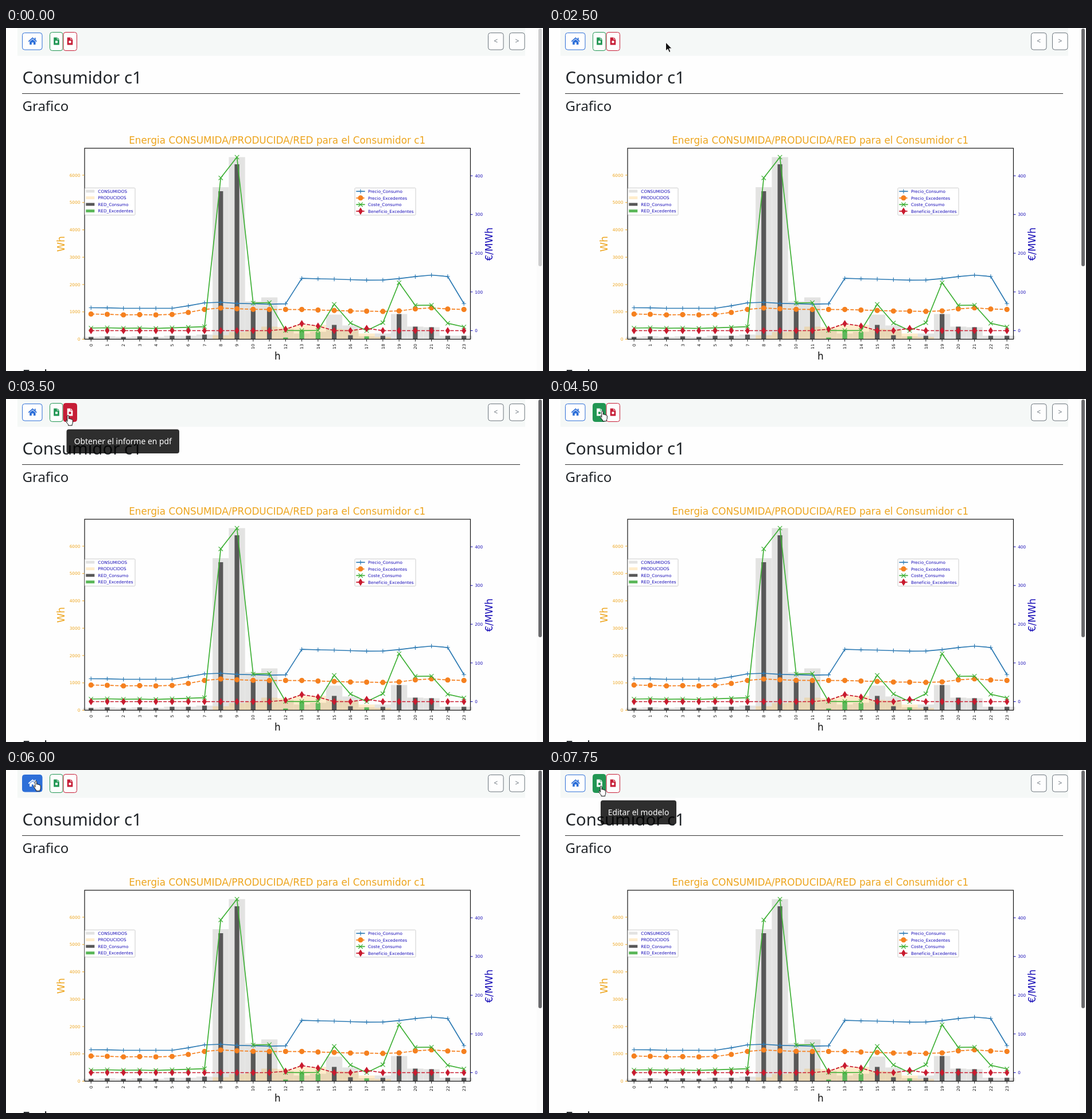
These frames come from a looping animation (936x599 px, 8000 ms). An HTML page:

```html
<!DOCTYPE html>
<html lang="es">
<head>
<meta charset="utf-8">
<title>Consumidor c1</title>
<style>
  html, body { margin: 0; width: 100%; height: 100%; overflow: hidden; background: #fefefe; }
  svg { display: block; }
  text { font-family: "Noto Sans", sans-serif; white-space: pre; }
  .chart text { font: 7.3px "DejaVu Sans", sans-serif; }
  .chart text.big { font-size: 16.83px; }
</style>
</head>
<body>
<svg id="stage" width="936" height="599" viewBox="0 0 936 599"></svg>
<script>
const stage = document.getElementById('stage');

function add(parent, tag, attrs = {}, text) {
  const node = document.createElementNS('http://www.w3.org/2000/svg', tag);
  set(node, attrs);
  if (text !== undefined) node.textContent = text;
  return parent.appendChild(node);
}
function set(node, attrs) {
  for (const key in attrs) node.setAttribute(key, attrs[key]);
}
const rect = (parent, x, y, width, height, attrs) =>
  add(parent, 'rect', { x, y, width, height, ...attrs });
const label = (parent, x, y, text, attrs) => add(parent, 'text', { x, y, ...attrs }, text);
const path = (parent, d, attrs) => add(parent, 'path', { d, ...attrs });

// Page
const INK = '#212529';
rect(stage, 20, 0, 885, 48.5, { fill: '#f5f8f7' });
rect(stage, 925, 0, 11, 599, { fill: '#fbfbfb' });
const thumb = rect(stage, 928, 1, 6, 415, { rx: 3 });
label(stage, 28.5, 97, 'Consumidor c1', { 'font-size': 29.4, fill: INK });
rect(stage, 28, 114, 868, 1, { fill: '#333' });
label(stage, 28.5, 145, 'Grafico', { 'font-size': 24, fill: INK });
label(stage, 28.5, 614, 'Fecha', { 'font-size': 24, fill: INK });

// Toolbar
function button(x, y, w, h, color, draw) {
  rect(stage, x, y, w, h, { rx: 4, fill: '#fefefe' });
  const back = rect(stage, x, y, w, h, { rx: 4, fill: color, stroke: color });
  const icon = add(stage, 'g');
  draw(icon);
  return level => {
    set(back, { 'fill-opacity': level });
    set(icon, { color: level > 0.5 ? '#fff' : color, opacity: level > 0.5 ? level : 1 });
    if (icon.mark) set(icon.mark, { fill: level > 0.5 ? color : '#fff' });
  };
}
function house(g) {
  path(g, 'M39.3 23.6L46.3 17.4L53.4 23.6', { fill: 'none', stroke: 'currentColor', 'stroke-width': 1.8 });
  path(g, 'M41.2 24.1L46.3 19.8L51.5 24.1V29H47.9V25.3H44.8V29H41.2ZM49.8 17H51.6V21H49.8Z', { fill: 'currentColor' });
}
const sheet = x => g => {
  path(g, `M${x} 16.5h5.6v3.7h4v9.3h-9.6zM${x + 6.4} 16.5l3.2 3.1h-3.2z`, { fill: 'currentColor' });
  g.mark = rect(g, x + 2.8, 22.3, 4, 4);
};
const arrowLabel = (x, text) => g =>
  label(g, x, 27, text, { 'font-size': 12, 'text-anchor': 'middle', fill: 'currentColor' });

const buttons = {
  home: button(28.5, 8.5, 34.5, 29.5, '#2d6fd8', house),
  excel: button(76.5, 7.5, 22.5, 32, '#219653', sheet(83.2)),
  pdf: button(100, 7.5, 23.5, 32, '#c61d36', sheet(106.7)),
};
button(840.5, 8.5, 26.5, 29.5, '#6c757d', arrowLabel(853.8, '<'))(0);
button(877.5, 8.5, 26.5, 29.5, '#6c757d', arrowLabel(891, '>'))(0);

// Chart
const ORANGE = '#eda51e', BLUE = '#1a0fb8';
const LEFT = 137, RIGHT = 809.5, TOP = 210, BOTTOM = 543.5;
const chart = add(stage, 'g', { class: 'chart' });
const hourX = h => 148.2 + 28.26 * h;
const hours = [...Array(24).keys()];

// Bar heights in pixels; the grid bars follow from their difference
const consumed = [4, 5, 4, 5, 4, 6, 6, 8, 265.5, 318, 66, 73, 18, 10, 13, 43, 24, 5, 10, 44, 22, 21, 6, 6];
const produced = h => ({ 8: 7, 9: 12.5, 10: 15, 11: 22, 12: 21, 13: 25, 14: 25, 15: 18, 16: 17, 17: 10, 18: 4 })[h] || 0;
function bars(height, width, attrs) {
  hours.forEach(h => {
    const size = height(h);
    if (size > 0) rect(chart, hourX(h) - width / 2, BOTTOM - size, width, size, attrs);
  });
}
const barStyles = [
  ['CONSUMIDOS', h => consumed[h], 28.26, { fill: '#e3e3e2' }],
  ['PRODUCIDOS', produced, 28.26, { fill: '#ffa500', 'fill-opacity': 0.2 }],
  ['RED_Consumo', h => consumed[h] - produced(h), 8.2, { fill: '#585858' }],
  ['RED_Excedentes', h => produced(h) - consumed[h], 8.2, { fill: '#5db85b' }],
];
barStyles.forEach(([, height, width, attrs]) => bars(height, width, attrs));

const surplus = { 12: 526, 13: 516.3, 14: 520.5, 17: 524.6 };
const lineStyles = [
  ['Precio_Consumo', '#2e7bb4', 'M-3.7 0H3.7M0 -3.7V3.7', false,
    [488.5, 488.6, 489.5, 489.5, 489.5, 489.5, 485.2, 480, 479, 480.8, 481.5, 482.3, 481.6, 437.2, 438, 438.5, 439.5, 440.3, 440.2, 437.7, 434.2, 431.5, 434, 481.2]],
  ['Precio_Excedentes', '#f5801f', 'M-4 0a4 4 0 1 0 8 0a4 4 0 1 0 -8 0', true,
    [499.5, 500, 501, 500.6, 501, 500.2, 496.7, 491.5, 489, 490.3, 491.2, 491.6, 491.5, 491.6, 492.5, 493.2, 494.2, 494.5, 494.9, 494, 490.5, 488.7, 490.7, 491.5]],
  ['Coste_Consumo', '#3eb035', 'M-3.7 -3.7L3.7 3.7M-3.7 3.7L3.7 -3.7', false,
    [524, 523.5, 524.4, 524, 524.7, 523.6, 522.7, 521.7, 261.8, 225.5, 480.3, 479.5, 528.2, 528.4, 528.2, 482.5, 515.2, 528.4, 514.7, 444.8, 484.4, 484, 515.6, 522]],
  ['Beneficio_Excedentes', '#c91b2f', 'M0 -5.3L3.4 0L0 5.3L-3.4 0Z', true,
    hours.map(h => surplus[h] || 528.5)],
];
function series(points, color, shape, dashed) {
  add(chart, 'polyline', {
    points: points.join(' '), fill: 'none', stroke: color, 'stroke-width': 1.7,
    'stroke-linejoin': 'round', 'stroke-dasharray': dashed ? '6 2.4' : 'none',
  });
  return ([x, y]) => path(chart, shape, {
    transform: `translate(${x} ${y})`, fill: dashed ? color : 'none', stroke: color, 'stroke-width': 1.15,
  });
}
lineStyles.forEach(([, color, shape, dashed, ys]) => {
  const points = ys.map((y, h) => [hourX(h), y]);
  points.forEach(series(points, color, shape, dashed));
});

rect(chart, LEFT, TOP, RIGHT - LEFT, BOTTOM - TOP, { fill: 'none', stroke: '#111', 'stroke-width': 1.2 });
const tick = (d, stroke) => path(chart, d, { stroke, 'stroke-width': 1 });
const turned = (x, y) => ({ transform: `rotate(-90 ${x} ${y})` });
for (let i = 0; i <= 6; i++) {
  const y = BOTTOM - 47.75 * i;
  tick(`M${LEFT - 4} ${y}h3.5`, ORANGE);
  label(chart, 129.3, y + 2.6, i * 1000, { 'text-anchor': 'end', fill: ORANGE });
}
for (let i = 0; i <= 4; i++) {
  const y = 528.5 - 67.6 * i;
  tick(`M${RIGHT + 0.5} ${y}h3.5`, BLUE);
  label(chart, 817.2, y + 2.7, i * 100, { fill: BLUE });
}
hours.forEach(h => {
  const x = hourX(h);
  tick(`M${x} ${BOTTOM}v4`, '#111');
  label(chart, x + 2.7, 551.7, h, { 'text-anchor': 'end', fill: '#111', ...turned(x + 2.7, 551.7) });
});
const big = (x, y, text, fill, attrs) =>
  label(chart, x, y, text, { class: 'big', 'text-anchor': 'middle', fill, ...attrs });
big(472.7, 202.3, 'Energia CONSUMIDA/PRODUCIDA/RED para el Consumidor c1', ORANGE);
big(473.3, 579, 'h', '#111');
big(101.8, 377, 'Wh', ORANGE, turned(101.8, 377));
big(848.3, 377.5, '€/MWh', BLUE, turned(848.3, 377.5));

const legendBox = (x, width) =>
  rect(chart, x, 279.3, width, 47.5, { rx: 1.5, fill: '#fff', 'fill-opacity': 0.8, stroke: '#ccc' });
legendBox(137.5, 87.5);
barStyles.forEach(([name, , , attrs], i) => {
  const y = 285 + 11.5 * i;
  rect(chart, 139.3, y - 2.5, 15, 5, attrs);
  label(chart, 160.3, y + 2.6, name, { fill: BLUE });
});
legendBox(608, 106);
lineStyles.forEach(([name, color, shape, dashed], i) => {
  const y = 285.3 + 11.5 * i;
  series([[610.3, y], [625.7, y]], color, shape, dashed)([618, y]);
  label(chart, 631, y + 2.7, name, { fill: BLUE });
});

// Tooltip and pointers
const tooltip = add(stage, 'g');
const tipBox = rect(tooltip, 0, 53, 0, 42, { rx: 4, fill: '#000', 'fill-opacity': 0.82 });
const tipText = label(tooltip, 0, 79, '', { 'font-size': 13.87, fill: '#fff', 'text-anchor': 'middle' });
const tips = {
  pdf: ['Obtener el informe en pdf', 105.5, 196.5],
  excel: ['Editar el modelo', 90, 132],
};
const outline = { 'stroke-width': 1, 'stroke-linejoin': 'round' };
const pointers = {
  arrow: path(stage, 'M.5 .5V15.5L4 12.3L6.5 18L9 16.9L6.6 11.4H11.3Z', { fill: '#111', stroke: '#fff', ...outline }),
  hand: path(stage, 'M3.3 11.8V2Q3.3.6 4.6.6T6 2V6.8Q6.2 5.9 7.2 6T8.5 7.3Q8.7 6.5 9.6 6.7T10.8 8.1Q11.2 7.5 12 7.8T12.8 9.5V13Q12.8 15 11.7 16.2V18.2H5V16.4Q3.7 15.2 .9 10.9Q.2 9.7 1.2 9.1T3.3 10.6',
    { fill: '#fff', stroke: '#111', ...outline }),
};

// Each step: start time, pointer, its position, button fill levels, tooltip
const steps = [
  [0],
  [1250, 'arrow', 177, 22],
  [1500, 'arrow', 194, 25],
  [1750, 'arrow', 203, 24.5],
  [2750, 'arrow', 155, 29],
  [3000, 'hand', 103.5, 28, { pdf: 1 }],
  [3500, 'hand', 103.5, 28, { pdf: 1 }, 'pdf'],
  [4500, 'hand', 88.5, 20.5, { excel: 1 }],
  [5000, 'hand', 88.5, 20.5, { excel: 1 }, 'excel'],
  [6000, 'hand', 47.5, 18.5, { home: 1 }],
  [7000, 'hand', 60, 21.5, { home: 0.85, excel: 0.13 }],
  [7250, 'hand', 86, 27.5, { excel: 1 }],
  [7750, 'hand', 86, 27.5, { excel: 1 }, 'excel'],
];

function render(time) {
  const t = time % 8000;
  const [, pointer, x, y, levels = {}, tip] = steps.findLast(step => step[0] <= t);
  set(thumb, { fill: t < 2500 ? '#cdcdce' : '#69696c' });
  for (const name in buttons) buttons[name](levels[name] || 0);
  for (const name in pointers) {
    set(pointers[name], { visibility: name === pointer ? 'visible' : 'hidden', transform: `translate(${x || 0} ${y || 0})` });
  }
  set(tooltip, { visibility: tip ? 'visible' : 'hidden' });
  if (tip) {
    const [text, left, width] = tips[tip];
    set(tipBox, { x: left, width });
    set(tipText, { x: left + width / 2 });
    tipText.textContent = text;
  }
}

const start = performance.now();
function loop() {
  render(performance.now() - start);
  requestAnimationFrame(loop);
}
loop();
</script>
</body>
</html>
```
